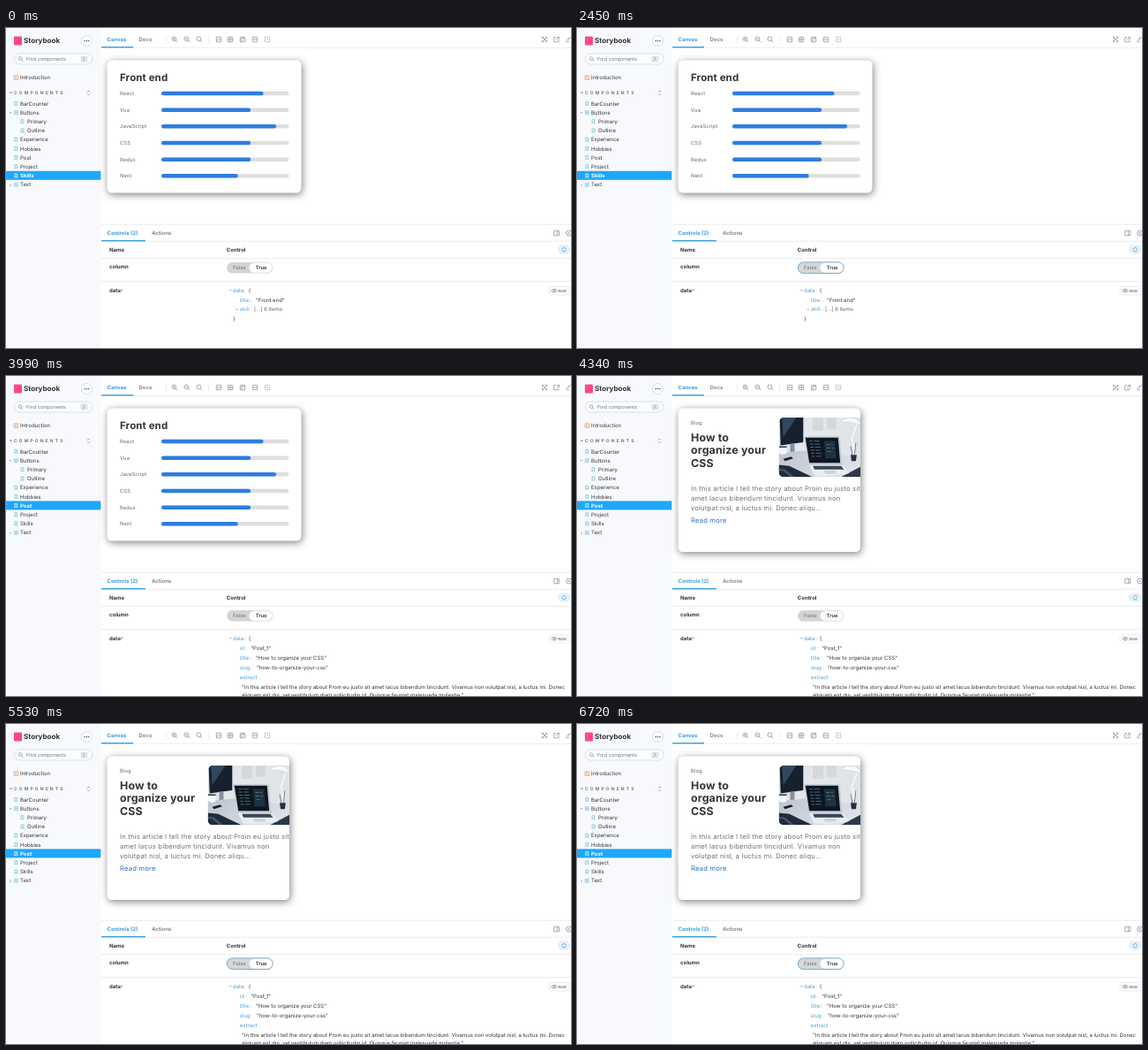
An HTML page for the animation above (6790 ms loop, 640 by 362 pixels).

```html
<!DOCTYPE html>
<html lang="en">
<head>
<meta charset="utf-8">
<title>Component explorer</title>
<style>
html, body { margin: 0; width: 100%; height: 100%; overflow: hidden; background: #fff; }
svg { display: block; }
#stage { width: 640px; height: 362px; }
text { font: 6px Inter, "Open Sans", sans-serif; fill: #333; text-rendering: geometricPrecision; white-space: pre; }
.bold { font-weight: 700; }
.blue { fill: #3a9be0; }
.key { fill: #4a9fd8; }
.muted { fill: #888; }
.white { fill: #fff; }
.brand { font-size: 8.1px; font-weight: 700; }
.search { font-size: 5.5px; fill: #777; }
.heading { font-size: 5px; font-weight: 700; fill: #777; letter-spacing: 2.1px; }
.tiny { font-size: 4px; font-weight: 600; fill: #777; }
.switch { font-size: 5.8px; font-weight: 600; }
.value { font-size: 6px; }
.label { font-size: 5.8px; fill: #666; letter-spacing: .12px; }
.title { font-size: 12.4px; font-weight: 700; letter-spacing: .15px; }
.front { font-size: 11.5px; letter-spacing: .1px; }
.body { font-size: 7.65px; fill: #707070; letter-spacing: .18px; }
.link { fill: #2870c0; }
.card { fill: #fff; filter: drop-shadow(1.8px 2.2px 4.4px rgba(0, 0, 0, .5)); }
.icon { fill: none; stroke: #959595; stroke-width: .8; }
.rule { fill: none; stroke: #e8e8e8; stroke-width: .8; }
</style>
</head>
<body>
<svg id="stage" viewBox="0 0 640 362" width="640" height="362">
  <defs>
    <linearGradient id="wall" x2="1" y2=".4">
      <stop stop-color="#cfd5dc"/><stop offset=".4" stop-color="#e4e7ea"/><stop offset="1" stop-color="#dfe2e6"/>
    </linearGradient>
    <linearGradient id="desk" x2="1" y2=".3">
      <stop stop-color="#b9c3cf"/><stop offset="1" stop-color="#dde2e8"/>
    </linearGradient>
    <symbol id="photo" viewBox="0 0 207 137" preserveAspectRatio="xMidYMid slice">
      <path fill="url(#wall)" d="M0 0H207V137H0Z"/>
      <path fill="#d3d8dd" d="M88 0H112V30H88ZM120 0H142V26H120Z"/>
      <path fill="#17212d" d="M12 0H66V57L14 64Z"/>
      <path fill="#33475c" d="M17 0H50L20 45Z"/>
      <path fill="#8490a0" d="M36 60H46V80H36Z"/>
      <path fill="url(#desk)" d="M0 82L70 76L207 92V137H0Z"/>
      <path fill="#1f2c3b" d="M0 108L34 111L88 137H0Z"/>
      <path fill="#465768" d="M0 116L24 119L46 137H38L20 123L0 121Z"/>
      <path fill="#2b3949" d="M152 137L207 108V137Z"/>
      <path fill="#f4f5f6" d="M10 66H28V82Q19 88 11 82Z"/>
      <path fill="#2a3642" d="M10 66H28V69H10Z"/>
      <path fill="#18222d" d="M20 95L38 90L43 94L24 100Z"/>
      <path fill="#c3cad2" d="M68 46Q68 43 71 43H146Q149 43 150 46L156 109H79Z"/>
      <path fill="#0d1621" d="M71 46H146L151 104H80Z"/>
      <path fill="#1d3240" d="M114 54H139L142 94H117Z"/>
      <path stroke="#5f8590" stroke-width="1.5" stroke-dasharray="8 3 13 4" d="M80 54H108M81 61H104M82 68H111M83 75H106M84 82H112M85 89H107M119 62H134M120 70H137M121 78H133"/>
      <path fill="#e9edf1" d="M79 109H156L172 128Q130 138 91 133Z"/>
      <path fill="#3a4652" d="M88 111H153L160 119H92Z"/>
      <path fill="#cbd2d9" d="M114 122H140L144 129H116Z"/>
      <path fill="none" stroke="#f8f8f8" stroke-width="3" d="M190 14L178 48L186 91"/>
      <path fill="#f8f9fa" stroke="#b9c0c8" d="M153 10Q161 -3 187 2L202 18Q177 10 153 10Z"/>
      <path fill="#26313b" d="M175 86H189L187 100H177Z"/>
      <path fill="none" stroke="#56626d" stroke-width="1.5" d="M179 86L175 66M184 86L187 58"/>
    </symbol>
  </defs>
  <g id="chrome"></g>
  <g id="sidebar"></g>
  <g id="canvas"></g>
  <g id="panel"></g>
</svg>
<script>
const LOOP = 6790;
const initial = { story: "Skills", selected: "Skills", args: "Skills", hover: "", column: true, focus: false, rowHover: false };
const steps = [
  [770, { column: false, focus: true }],
  [1540, { column: true }],
  [1890, { column: false }],
  [2450, { column: true }],
  [3010, { hover: "Project" }],
  [3150, { hover: "Post" }],
  [3430, { selected: "Post", hover: "" }],
  [3710, { args: "Post", focus: false }],
  [4200, { story: "Post" }],
  [4690, { column: false, focus: true }],
  [5040, { column: true }],
  [6020, { column: false }],
  [6370, { rowHover: true }],
  [6580, { column: true, rowHover: false }]
];

const skills = [["React", .8], ["Vue", .7], ["JavaScript", .9], ["CSS", .7], ["Redux", .7], ["Next", .6]];
const stories = [
  ["BarCounter"], ["Buttons", "group"], ["Primary", "nested"], ["Outline", "nested"], ["Experience"],
  ["Hobbies"], ["Post"], ["Project"], ["Skills"], ["Text", "group"]
];

const text = (x, y, content, style = "") => `<text x="${x}" y="${y}" class="${style}">${content}</text>`;
const path = (d, style = "icon", extra = "") => `<path d="${d}" class="${style}" ${extra}/>`;
const box = (x, y, w, h, fill, r = 0, extra = "") =>
  `<rect x="${x}" y="${y}" width="${w}" height="${h}" rx="${r}" fill="${fill}" ${extra}/>`;
const ring = (x, y, r, extra = "") => `<circle cx="${x}" cy="${y}" r="${r}" class="icon" ${extra}/>`;
const paint = (id, markup) => { document.getElementById(id).innerHTML = markup; };

function chrome() {
  const zoom = [191, 205, 219].map(x => ring(x - .6, 12.3, 2.4) + path(`M${x + 1.2} 14.1l2 2`)).join("");
  const tools = [241, 254, 268, 282, 296].map((x, i) =>
    box(x - 2.7, 10.3, 5.4, 5.4, "none", .5, `class="icon"${i === 4 ? ' stroke-dasharray="1.4 .8"' : ""}`) +
    path(["M-2.5 1.5l2-2 1.5 1.2 1.5-1.5", "M0-2.7v5.4M-2.7 0h5.4", "M-1 2.7v-4h3.7", "M-2.7 0h5.4", "M-1 0h2"][i],
      "icon", `transform="translate(${x} 13)"`)).join("");
  return box(0, 0, 107.3, 362, "#f7f9fc") +
    path("M108 22.3H640M108 222.3H640M108 241.3H640M108 260.5H640M108 286.5H640M181.5 8.5V17.5M229.5 8.5V17.5", "rule") +
    box(9, 9.5, 9, 10, "#ff4785", 1) + text(20, 17.4, "Storybook", "brand") +
    `<circle cx="91.5" cy="14.5" r="6" fill="#fff" stroke="#ccd5dc" stroke-width=".8"/>` +
    [89.2, 91.5, 93.8].map(x => `<circle cx="${x}" cy="14.5" r=".75" fill="#444"/>`).join("") +
    box(9.5, 29, 88.5, 12, "#fafcfd", 6, 'stroke="#d2d8dd" stroke-width=".8"') +
    ring(16.2, 34.6, 1.8) + path("M17.5 36l1.8 1.8") + text(23, 37.1, "Find components", "search") +
    box(84.5, 31.5, 8, 7, "#dfe4e8", 1.5) + text(87.3, 37, "/", "search") +
    box(9, 53.7, 4.6, 4.8, "none", .4, 'stroke="#f0a060" stroke-width=".8"') +
    path("M10 55.3h2.6M10 57h2.6", "icon", 'style="stroke:#f0a060"') + text(16, 58.2, "Introduction") +
    path("M4.2 72.8h2.4l-1.2 1.4z") + text(9, 75.4, "COMPONENTS", "heading") +
    path("M92 72.5l1.5-1.6 1.5 1.6M92 74.3l1.5 1.6 1.5-1.6") +
    text(114.5, 15.1, "Canvas", "bold blue") + text(150.5, 15.1, "Docs", "bold muted") + box(108, 21, 36, 1.4, "#3a9fe0") +
    zoom + path("M189.2 12.3h2.4M190.4 11.1v2.4M203.2 12.3h2.4M217 11l-1-1") + tools +
    path("M607.5 12v-1.7h1.7M611 10.3h1.7V12M612.7 14v1.7H611M609.2 15.7h-1.7V14M607.5 10.3l5 5.2M612.7 10.3l-5 5.2") +
    path("M623 10.5h-2.3v5.2h5.3v-2.2M624 10.3h2.5v2.5M626.5 10.3l-3.5 3.5") +
    path("M638 10.8l-3 3q-.8 1.8 1 2l2-1M637 13l3-3") +
    text(114.5, 234.2, "Controls (2)", "bold blue") + text(165, 234.2, "Actions", "bold muted") +
    box(108, 240, 50, 1.4, "#3a9fe0") +
    box(620.8, 229.3, 5.7, 5.5, "none", .4, 'class="icon"') + path("M624.5 229.3v5.5") +
    ring(637.5, 232, 3) + path("M636.3 230.8l2.4 2.4M638.7 230.8l-2.4 2.4") +
    text(117, 253.1, "Name", "bold") + text(249.8, 253.1, "Control", "bold") +
    box(625.7, 246, 13, 9, "#e8f4fd", 4.5, 'stroke="#b7dff8" stroke-width=".6"') +
    path("M630 250.4q.5-2 2.3-2t2.3 2M634.5 250.9q-.5 2-2.3 2t-2.3-2", "icon", 'style="stroke:#4a9fdc"') +
    text(117, 272.2, "column", "bold") + text(117, 298.7, 'data<tspan fill="#c4574f" font-size="5">*</tspan>', "bold");
}

function sidebar({ selected, hover }) {
  return stories.map(([name, kind], i) => {
    const y = 85.5 + i * 10.2;
    const active = name === selected;
    const x = kind === "nested" ? 18.5 : 11.3;
    const color = active ? "#fff" : kind === "group" ? "#7ab9e8" : "#6cc4d2";
    const row = active ? "#1ea7fd" : name === hover ? "#e7ecef" : "";
    const icon = kind === "group"
      ? path(`M${x - 2} ${y - 2}h4v4h-4zM${x} ${y - 2}v4M${x - 2} ${y}h4`, "icon", `style="stroke:${color};stroke-width:.6"`) +
        path(name === "Text" ? "M4.5 176.5l1.3 1.2-1.3 1.2" : `M4 ${y}h2.4`)
      : path(`M${x - 1.4} ${y - 2.1}h2.8v4.3l-1.4-1.2-1.4 1.2z`, "icon", `style="stroke:${color}"`);
    return (row && box(0, y - 5.3, 107.3, 10, row)) + icon +
      text(kind === "nested" ? 24 : 16, y + 2.1, name, active ? "bold white" : "");
  }).join("");
}

function skillsCard(column) {
  const rows = skills.map(([name, level], i) => {
    const x = 129 + (column ? 0 : i % 2 * 215);
    const y = 74 + (column ? i : i >> 1) * 18.65;
    return text(x, y + 2, name, "label") + box(x + 47, y - 2.2, 144.5, 4.5, "#dedede", 2.25) +
      box(x + 47, y - 2.2, 144.5 * level, 4.5, "#2d7de1", 2.25);
  });
  return `<rect class="card" x="114.5" y="36.5" width="${column ? 220 : 434.5}" height="${column ? 150 : 94}" rx="5.5"/>` +
    text(129, 60, "Front end", "title front") + rows.join("");
}

function postCard(column) {
  const lines = column
    ? ["In this article I tell the story about Proin eu justo sit", "amet lacus bibendum tincidunt. Vivamus non", "volutpat nisl, a luctus mi. Donec aliqu..."]
    : ["In this article I tell the story about Proin eu justo sit", "amet lacus bibendum tincidunt. Vivamus non volutpat", "nisl, a luctus mi. Donec aliqu..."];
  const heading = column ? ["How to", "organize your", "CSS"] : ["How to organize your CSS"];
  const top = column ? 130 : 127.6;
  const [x, w, h] = column ? [228.5, 92.5, 67.5] : [342.5, 206.5, 137];
  return `<rect class="card" x="114.5" y="36.5" width="${column ? 206.5 : 434.5}" height="${column ? 162.5 : 157.5}" rx="5.5"/>` +
    text(129, 54.7, "Blog", "label") +
    heading.map((line, i) => text(129, 74 + i * 14.4, line, "title")).join("") +
    lines.map((line, i) => text(129, top + i * 11.1, line, "body")).join("") +
    text(129, top + 36, "Read more", "body link") +
    `<svg x="${x}" y="47" width="${w}" height="${h}">
      <clipPath id="corners"><rect width="${w + 10}" height="${h}" rx="6"/></clipPath>
      <g clip-path="url(#corners)"><use href="#photo" width="${w}" height="${h}"/></g>
    </svg>`;
}

function toggle({ column, focus }) {
  const outline = focus ? 'stroke="#6ea6d2" stroke-width=".9"' : "";
  return box(250.2, 264.9, 52, 12.6, focus ? "#d3d7da" : "#d4d4d4", 6.3, outline) +
    box(column ? 275.5 : 251, 265.7, column ? 26 : 28, 11, "#fff", 5.5) +
    text(257, 273.2, "False", column ? "switch muted" : "switch") +
    text(282.7, 273.2, "True", column ? "switch" : "switch muted");
}

function tree({ args, rowHover }) {
  const field = (y, x, key, value, valueX) => text(x, y, key + '<tspan fill="#888"> :</tspan>', "key") + text(valueX, y, value, "value");
  const root = (rowHover ? box(250, 292, 388, 10, "#e8f4fd") + ring(283, 297, 2, 'opacity=".6"') + path("M281.9 297h2.2") : "") +
    path("M253 296.8h2.4") + field(299, 257, "data", "{", 274.7);
  const rows = args === "Skills"
    ? field(309.8, 264.8, "title", '"Front end"', 283) + path("M260.5 318.3h2.4") +
      field(320.4, 264.8, "skill", '<tspan fill="#666">[...] 6 items</tspan>', 281) + text(257, 331, "}")
    : field(310, 264.8, "id", '"Post_1"', 277.3) +
      field(321, 264.8, "title", '"How to organize your CSS"', 283) +
      field(332, 264.8, "slug", '"how-to-organize-your-css"', 284) +
      field(343, 264.8, "extract", "", 290) +
      text(267, 354, '"In this article I tell the story about Proin eu justo sit amet lacus bibendum tincidunt. Vivamus non volutpat nisl, a luctus mi. Donec', "value") +
      text(267, 362.6, 'aliquam est dui, vel vestibulum diam sollicitudin id. Quisque feugiat malesuada molestie."', "value");
  const raw = box(614.5, 292.3, 30, 9.8, "#f8f9fa", 4.9, 'stroke="#e6e8ea" stroke-width=".6"') +
    path("M617.8 297.2q3.2-3.7 6.4 0q-3.2 3.7-6.4 0z") + ring(621, 297.2, .9) + text(625.5, 298.8, "RAW", "tiny");
  return root + rows + raw;
}

function render(state) {
  paint("sidebar", sidebar(state));
  paint("canvas", state.story === "Skills" ? skillsCard(state.column) : postCard(state.column));
  paint("panel", toggle(state) + tree(state));
}

const start = performance.now();
let shown = -1;

function tick() {
  const time = (performance.now() - start) % LOOP;
  const past = steps.filter(([at]) => at <= time);
  if (past.length !== shown) {
    shown = past.length;
    render(Object.assign({}, initial, ...past.map(([, change]) => change)));
  }
  requestAnimationFrame(tick);
}

paint("chrome", chrome());
tick();
</script>
</body>
</html>
```
